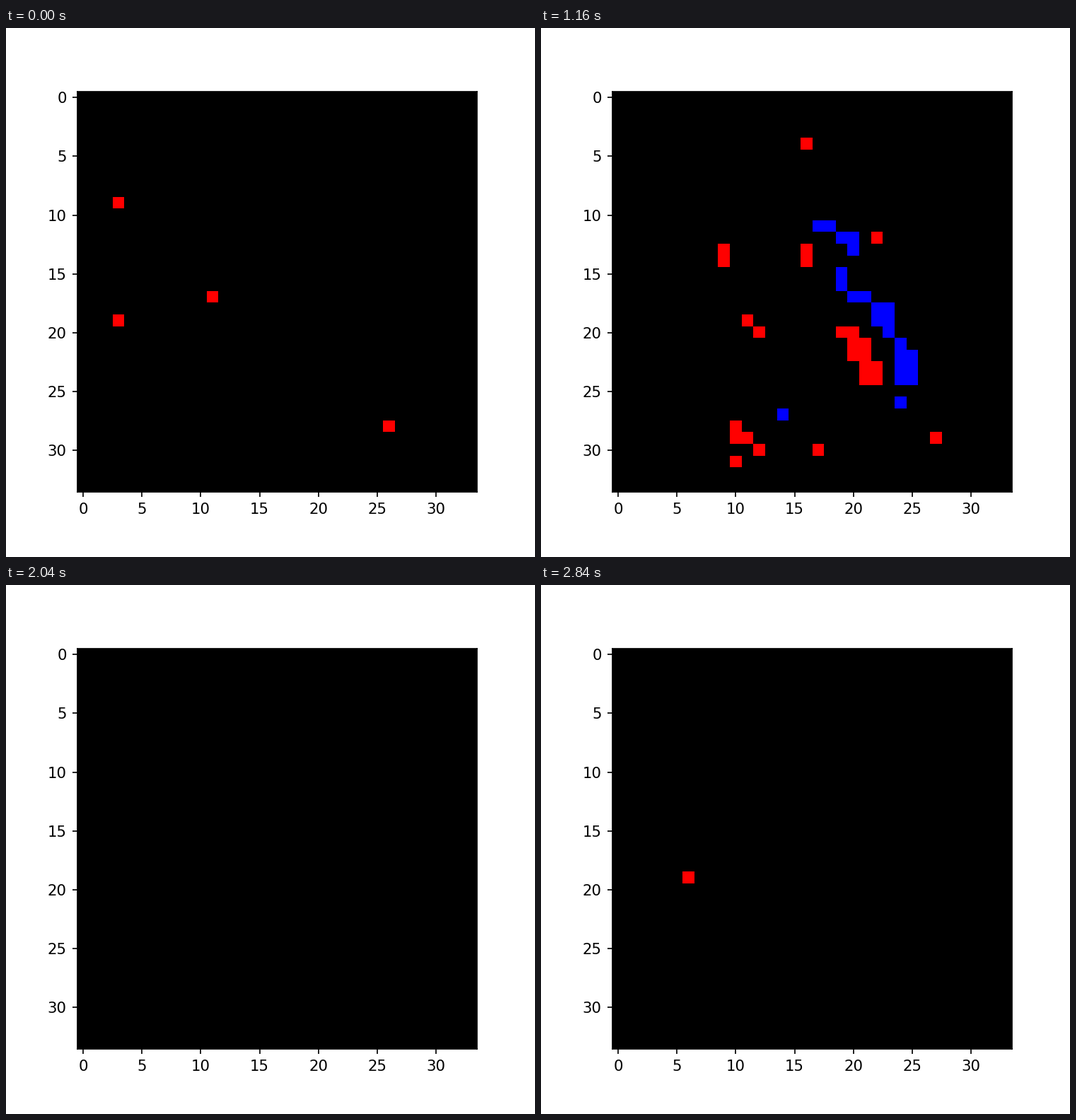
A matplotlib script for the animation above (2.88 s loop, 748 px wide and 748 px high).

```python
import numpy as np
import matplotlib.pyplot as plt
from matplotlib.animation import FuncAnimation

STAGE, DPI = 748, 153
GRID, FRAMES, STEP = 34, 72, 40
RED, BLUE = (1, 0, 0), (0, 0, 1)

# Centre line of the digit: upper loop, then lower bowl (column, row)
UPPER = [(12.3, 8.5), (15, 7.6), (18, 7), (19.7, 8.3), (19.2, 10.8),
         (17.3, 12.9), (13.9, 14)]
LOWER = [(17.3, 13.2), (20.5, 13.2), (22.8, 14.8), (24.6, 17.5),
         (24.7, 20.2), (22.8, 22.7), (19.5, 23.9), (16, 24), (13.4, 23.6)]
RADIUS, SOFT = 1.5, 0.42
LIMIT, SPREAD = 0.09, 0.25          # change that fires a cell, and its scatter
STRAYS = 2.5                        # mean number of noise events per frame

# Sensor sweep: down, up to the right, back to the left, with short rests
KEY_T = [2, 16, 22, 26, 32, 41, 47, 53, 64, 70]
KEY_X = [-4, -3, -2.6, -2.5, -1, 0, 0.5, 0.9, -2.4, -4]
KEY_Y = [-0.6, 4.3, 4.9, 4.9, 4.2, 0, -1.2, -1.2, -0.7, -0.6]

rows, cols = np.mgrid[:GRID, :GRID]
cells = np.stack([cols, rows], axis=-1).astype(float)


def offset(t):
    """Shift of the digit, the path rounded off by a moving mean."""
    near = t + np.linspace(-2, 2, 9)
    return np.array([np.interp(near, KEY_T, key, period=FRAMES).mean()
                     for key in (KEY_X, KEY_Y)])


def distance(points, line):
    best = np.full(points.shape[:2], np.inf)
    for a, b in zip(np.array(line), np.array(line[1:])):
        ab = b - a
        along = np.clip((points - a) @ ab / (ab @ ab), 0, 1)
        gap = points - a - along[..., None] * ab
        best = np.minimum(best, np.hypot(gap[..., 0], gap[..., 1]))
    return best


def brightness(t):
    points = cells - offset(t)
    d = np.minimum(distance(points, UPPER), distance(points, LOWER))
    return 1 / (1 + np.exp((d - RADIUS) / SOFT))


def render(k):
    """Blue where a cell brightens, red where it darkens, plus stray events."""
    rng = np.random.default_rng(100 + k)
    change = brightness(k + 0.5) - brightness(k - 0.5)
    limit = LIMIT * np.exp(SPREAD * rng.standard_normal(change.shape))
    img = np.zeros((GRID, GRID, 3))
    img[change > limit] = BLUE
    img[change < -limit] = RED
    for _ in range(rng.poisson(STRAYS)):
        x, y = rng.integers(0, GRID, 2)
        img[y, x] = RED if rng.random() < 0.85 else BLUE
    return img


fig = plt.figure(figsize=(STAGE / DPI, STAGE / DPI), dpi=DPI, facecolor="white")
left, top, side = 100.65, 89.9, 565.8
ax = fig.add_axes([left / STAGE, 1 - (top + side) / STAGE,
                   side / STAGE, side / STAGE], facecolor="black")
edges = np.arange(GRID + 1) - 0.5
lift = 1.15 * GRID / side           # cells sit about a pixel above the ticks
mesh = ax.pcolormesh(edges, edges - lift, render(0))
ax.set_xlim(-0.5, GRID - 0.5)
ax.set_ylim(GRID - 0.5, -0.5)
ax.set_xticks(range(0, GRID, 5))
ax.set_yticks(range(0, GRID, 5))


def update(k):
    mesh.set_array(render(k))
    return [mesh]


anim = FuncAnimation(fig, update, frames=FRAMES, interval=STEP,
                     repeat=True, repeat_delay=0, blit=False)
plt.show()
```
